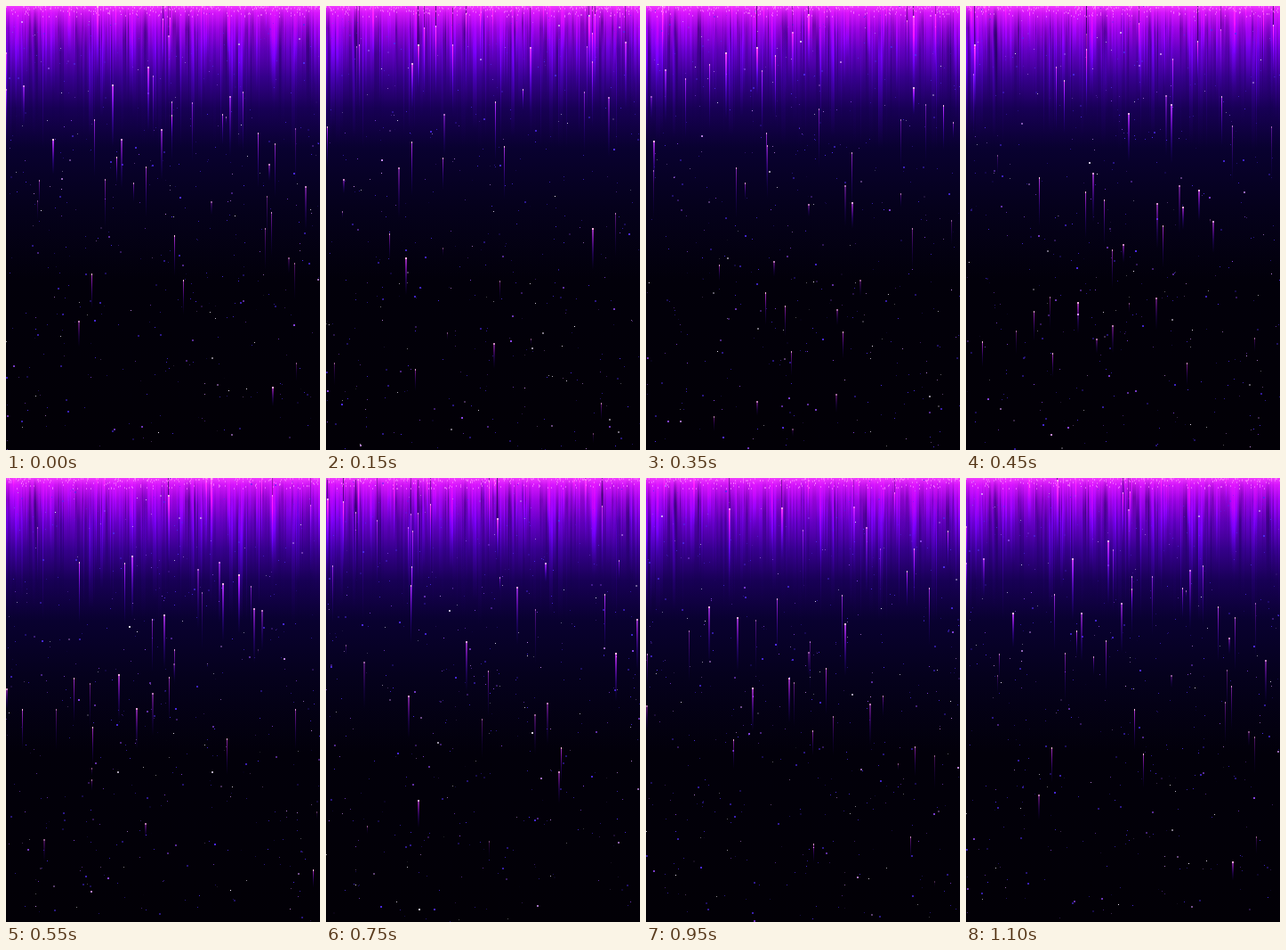
Animation, 353 px wide and 498 px high, one loop 1.15 s. Source, as an HTML page with a canvas:

```html
<!DOCTYPE html>
<html lang="en">
<head>
<meta charset="utf-8">
<title>Rising light</title>
<style>
html, body { margin: 0; width: 100%; height: 100%; overflow: hidden; background: #020006; }
canvas { display: block; width: 100%; height: 100%; }
</style>
</head>
<body>
<canvas id="stage" width="353" height="498"></canvas>
<script>
const W = 353, H = 498;
const STEP = 50, LOOP = 1150;
const PERIOD = 1102; // motion repeats just after the last step
const TURN = 2 * Math.PI;
const ctx = document.getElementById('stage').getContext('2d');

let seed = 77;
function rand(min = 0, max = 1) {
  seed = (seed * 1664525 + 1013904223) >>> 0;
  return min + (max - min) * seed / 4294967296;
}
const randX = () => Math.floor(rand(0, W));
const make = (count, build) => Array.from({ length: count }, build);
const ageOf = (part, time) => ((time - part.born) % PERIOD + PERIOD) % PERIOD;

function gradient(y0, y1, stops) {
  const g = ctx.createLinearGradient(0, y0, 0, y1);
  stops.forEach(([at, color]) => g.addColorStop(at, color));
  return g;
}

const streaks = make(165, () => ({
  x: randX(), from: rand(130, 500), born: rand(0, PERIOD), life: rand(220, 650),
  speed: rand(.95, 1.2), sway: rand(-3, 3),
  wide: rand() < .35 ? 2 : 1, glow: rand(.35, .95)
}));

const columns = make(320, () => ({
  x: Math.floor(rand(-3, W)), wide: Math.ceil(rand() ** 2 * 5), tall: rand(50, 165),
  phase: rand(0, TURN), turns: Math.ceil(rand(0, 4)), power: rand(.08, .42),
  dark: rand() < .58
}));

const starColor = pick =>
  pick < .58 ? '#4f2cf0' : pick < .8 ? '#8a45e8' : pick < .9 ? '#c88cf0' : '#f4e8ff';

const stars = make(1050, () => ({
  x: randX(), y: rand(20, 550), born: rand(0, PERIOD), life: rand(300, 750),
  speed: rand(.03, .25), size: rand() < .2 ? 2 : 1,
  color: starColor(rand()), glow: rand(.35, 1)
}));

const sparks = make(500, () => ({
  x: randX(), y: Math.floor(rand() ** 2 * 12), born: rand(0, PERIOD), life: PERIOD / 2
}));

const sky = gradient(0, H, [
  [0, '#f03cff'], [.015, '#d616fb'], [.05, '#a004e6'], [.1, '#6500c4'],
  [.16, '#37008e'], [.23, '#180056'], [.32, '#090130'], [.45, '#05011c'],
  [.62, '#02000a'], [1, '#020006']
]);

function drawColumn(c, angle) {
  const tint = c.dark ? '14,0,66' : '85,0,190';
  const alpha = c.power * (.6 + .4 * Math.sin(angle * c.turns + c.phase));
  ctx.globalCompositeOperation = c.dark ? 'source-over' : 'lighter';
  ctx.fillStyle = gradient(0, c.tall, [
    [0, `rgba(${tint},0)`], [.35, `rgba(${tint},${alpha})`], [1, `rgba(${tint},0)`]
  ]);
  ctx.fillRect(c.x, 0, c.wide, c.tall);
}

function drawStar(s, time) {
  const age = ageOf(s, time);
  if (age > s.life) return;
  ctx.globalAlpha = s.glow * Math.sqrt(Math.sin(Math.PI * age / s.life));
  ctx.fillStyle = s.color;
  ctx.fillRect(s.x, Math.round(s.y - age * s.speed), s.size, s.size);
}

function drawStreak(s, time) {
  const age = ageOf(s, time);
  const x = Math.round(s.x + s.sway * age / s.life);
  const y = Math.round(s.from - age * s.speed);
  const tail = Math.min(12 + (H - y) * .14, 6 + age * .4);
  if (age > s.life || y < -tail) return;
  ctx.globalAlpha = s.glow * Math.min(1, .4 + age / 100, (s.life - age) / 80);
  // A thin shadow runs ahead of the head inside the bright band
  if (y > 0 && y < 50) {
    ctx.fillStyle = 'rgba(22,0,70,.7)';
    ctx.fillRect(x, 0, 1, y);
  }
  ctx.globalCompositeOperation = 'lighter';
  ctx.fillStyle = gradient(y, y + tail, [
    [0, 'rgba(215,80,225,.9)'], [.25, 'rgba(165,30,205,.75)'],
    [.6, 'rgba(85,10,180,.4)'], [1, 'rgba(40,0,150,0)']
  ]);
  ctx.fillRect(x, y, s.wide, tail);
  ctx.globalCompositeOperation = 'source-over';
  ctx.fillStyle = '#ffc4e6';
  ctx.fillRect(x, y, s.wide, 2);
}

function draw(time) {
  ctx.globalAlpha = 1;
  ctx.globalCompositeOperation = 'source-over';
  ctx.fillStyle = sky;
  ctx.fillRect(0, 0, W, H);
  columns.forEach(c => drawColumn(c, time / PERIOD * TURN));
  ctx.globalCompositeOperation = 'source-over';
  stars.forEach(s => drawStar(s, time));
  streaks.forEach(s => drawStreak(s, time));
  ctx.globalAlpha = .55;
  ctx.fillStyle = '#ff8cff';
  sparks.forEach(s => {
    if (ageOf(s, time) < s.life) ctx.fillRect(s.x, s.y, 1, 2);
  });
}

let shown = -1;
function tick() {
  const time = Math.floor(performance.now() % LOOP / STEP) * STEP;
  if (time !== shown) draw(shown = time);
  requestAnimationFrame(tick);
}
tick();
</script>
</body>
</html>
```
